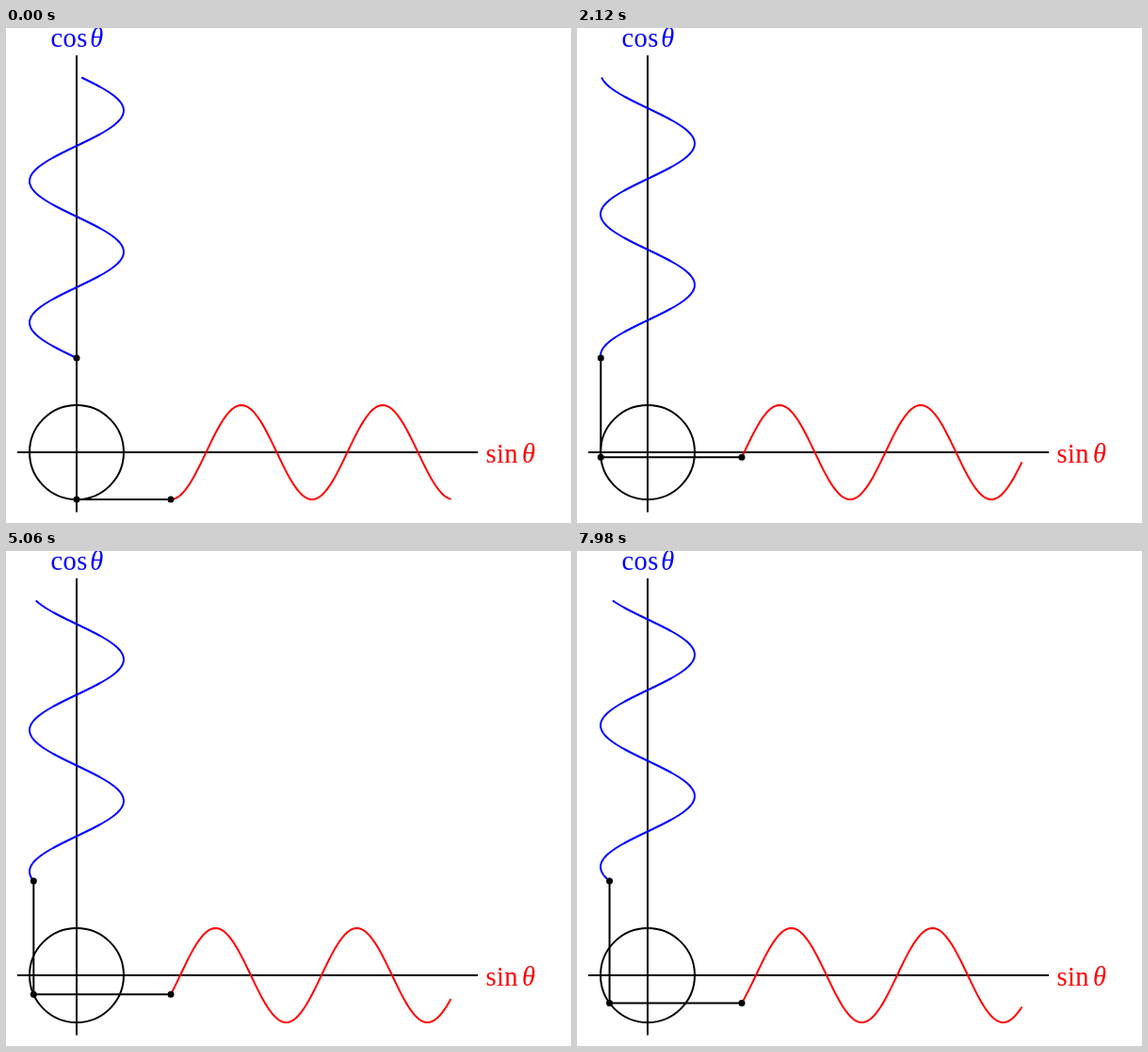
Animation, 600 px wide and 525 px high, one loop 8000 ms. Source, as an HTML page:

```html
<!DOCTYPE html>
<html lang="en">
<head>
<meta charset="utf-8">
<title>Sine and cosine from a circle</title>
<style>
  html, body { margin: 0; width: 100%; height: 100%; overflow: hidden; background: #fff; }
  svg { display: block; width: 600px; height: 525px; }
  .stroke { fill: none; stroke: #000; stroke-width: 2; stroke-linejoin: round; }
  text { font: 28.5px "Liberation Serif", "Times New Roman", serif; letter-spacing: .4px; }
  tspan { font-style: italic; letter-spacing: 0; }
</style>
</head>
<body>
<svg viewBox="0 0 600 525">
  <g class="stroke">
    <path d="M12 450H501M75 29V513.5"/>
    <circle cx="75" cy="450" r="50"/>
    <path id="links"/>
    <path id="sine" stroke="#f00"/>
    <path id="cosine" stroke="#00f"/>
  </g>
  <circle id="onCircle" r="3.5"/>
  <circle id="onSine" r="3.5"/>
  <circle id="onCosine" r="3.5"/>
  <text x="47.5" y="19.5" fill="#00f">cos<tspan dx="2.5">θ</tspan></text>
  <text x="509.5" y="460.5" fill="#f00">sin<tspan dx="4">θ</tspan></text>
</svg>
<script>
const LOOP = 8000;
const CENTER = { x: 75, y: 450 }, RADIUS = 50;
const SINE_X = 175, COSINE_Y = 350;
const STEP = Math.PI / 30, SPACING = 2.5, SAMPLES = 120;

const el = id => document.getElementById(id);
const xAt = angle => CENTER.x + RADIUS * Math.cos(angle);
const yAt = angle => CENTER.y - RADIUS * Math.sin(angle);

// Steps come in threes, held for 20, 20 and 100 ms; the loop starts on the second.
function stepAt(time) {
  const shifted = time + 20, rest = shifted % 140;
  return 3 * Math.floor(shifted / 140) + (rest < 20 ? 0 : rest < 40 ? 1 : 2) - 1;
}

function curve(id, point) {
  const points = Array.from({ length: SAMPLES }, (_, i) => point(i).map(v => v.toFixed(2)).join(" "));
  el(id).setAttribute("d", "M" + points.join("L"));
}

function place(id, x, y) {
  el(id).setAttribute("cx", x);
  el(id).setAttribute("cy", y);
}

function draw(step) {
  const angle = step * STEP - Math.PI / 2;
  const x = xAt(angle), y = yAt(angle);
  curve("sine", i => [SINE_X + i * SPACING, yAt(angle - i * STEP)]);
  curve("cosine", i => [xAt(angle - i * STEP), COSINE_Y - i * SPACING]);
  el("links").setAttribute("d", `M${x} ${COSINE_Y}V${y}H${SINE_X}`);
  place("onCircle", x, y);
  place("onSine", SINE_X, y);
  place("onCosine", x, COSINE_Y);
}

const start = performance.now();
function tick(now) {
  draw(stepAt(Math.max(0, now - start) % LOOP));
  requestAnimationFrame(tick);
}
draw(0);
requestAnimationFrame(tick);
</script>
</body>
</html>
```
